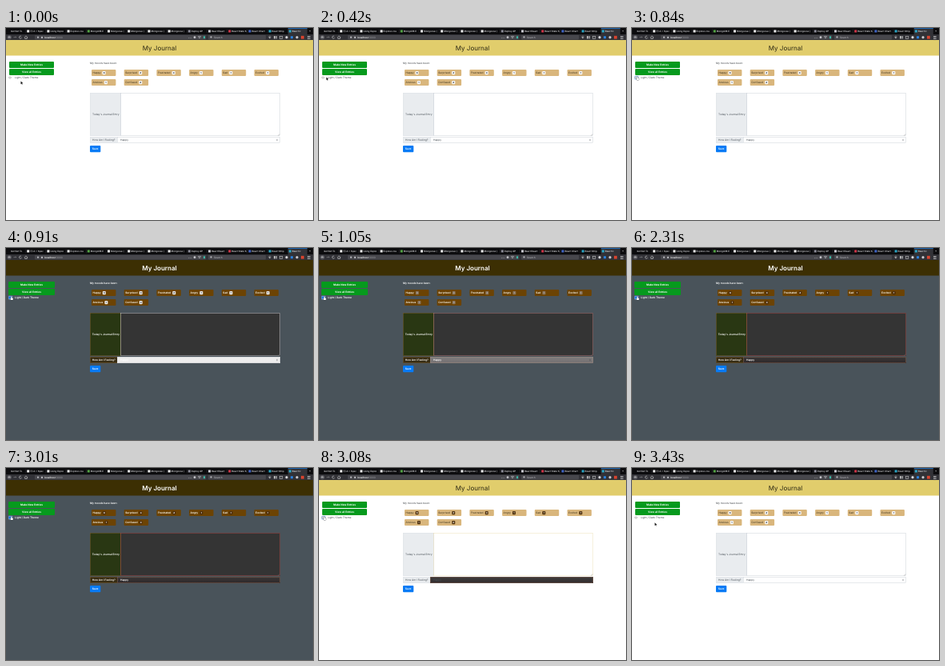
Write an HTML page with a canvas that moves like this. It is 384 px wide and 240 px high and loops after 3500 ms.

```html
<!DOCTYPE html>
<html lang="en">
<head>
<meta charset="utf-8">
<title>My Journal</title>
<style>
html, body { margin: 0; width: 100%; height: 100%; overflow: hidden; background: #fff; }
canvas { display: block; width: 100%; height: 100%; }
</style>
</head>
<body>
<canvas id="stage" width="384" height="240"></canvas>
<script>
const ctx = document.getElementById('stage').getContext('2d');
const LOOP = 3500, STEP = 70, FADE = 330;
const DARK_AT = 910, LIGHT_AT = 3080;

const themes = {
  light: {
    page: '#ffffff', header: '#e1cd6c', title: '#2c2814', ink: '#3f4448', weight: 400,
    titleWeight: 400, mood: '#d9b67c', moodInk: '#3c3320', label: '#e9ecef',
    labelEdge: '#dde1e5', labelInk: '#495057', area: '#ffffff', rowLabel: '#e9ecef',
    fieldInk: '#495057', focusEdge: '#efe2b8'
  },
  dark: {
    page: '#49535a', header: '#3c2f03', title: '#ffffff', ink: '#ffffff', weight: 600,
    titleWeight: 600, mood: '#6c4303', moodInk: '#ffffff', label: '#293713',
    labelEdge: '#7d6038', labelInk: '#ffffff', area: '#343434', rowLabel: '#372c12',
    fieldInk: '#ffffff', focusEdge: '#a34a48'
  }
};

const tabs = [
  ['Get Set To', ''], ['(1) A > Spec', '#eeeeee'], ['Using Expre', '#eeeeee'],
  ['Express rou', '#eeeeee'], ['MongoDB E', '#55a646'], ['Mongoose (', '#eeeeee'],
  ['Mongoose (', '#eeeeee'], ['Mongoose (', '#eeeeee'], ['Mongoose (', '#eeeeee'],
  ['Deploy AP', '#8c8c98'], ['React React', '#c9c9d0'], ['React State S', '#d2374a'],
  ['React Chart', '#4267c8'], ['React Strip', '#2ba7c7'], ['React Ic', '#2ba7c7']
];
const moods = ['Happy', 'Surprised', 'Frustrated', 'Angry', 'Sad', 'Excited', 'Anxious', 'Confused'];
const counts = [6, 4, 4, 1, 1, 1, 1, 4];

const clamp = v => Math.max(0, Math.min(1, v));
const ease = v => v * v * (3 - 2 * v);

function mix(a, b, p) {
  const part = (c, i) => parseInt(c.slice(i, i + 2), 16);
  return 'rgb(' + [1, 3, 5].map(i => Math.round(part(a, i) + (part(b, i) - part(a, i)) * p)) + ')';
}

function rect(x, y, w, h, fill) {
  ctx.fillStyle = fill;
  ctx.fillRect(x, y, w, h);
}

function round(x, y, w, h, r, fill) {
  ctx.fillStyle = fill;
  ctx.beginPath();
  ctx.roundRect(x, y, w, h, r);
  ctx.fill();
}

function frame(x, y, w, h, color, width = 0.5) {
  ctx.strokeStyle = color;
  ctx.lineWidth = width;
  ctx.strokeRect(x, y, w, h);
}

function line(points, color, width = 0.6) {
  ctx.strokeStyle = color;
  ctx.lineWidth = width;
  ctx.beginPath();
  points.forEach(([x, y], i) => i ? ctx.lineTo(x, y) : ctx.moveTo(x, y));
  ctx.stroke();
}

function dot(x, y, r, fill) {
  ctx.fillStyle = fill;
  ctx.beginPath();
  ctx.arc(x, y, r, 0, Math.PI * 2);
  ctx.fill();
}

// Draws text and returns its width.
function text(str, x, y, size, color, weight = 400, align = 'left') {
  ctx.font = `${weight} ${size}px Inter, "Liberation Sans", sans-serif`;
  ctx.textRendering = 'geometricPrecision';
  ctx.textAlign = align;
  ctx.textBaseline = 'middle';
  ctx.fillStyle = color;
  ctx.fillText(str, x, y);
  return ctx.measureText(str).width;
}

function drawTabs() {
  rect(0, 0, 384, 8, '#0c0c0e');
  tabs.forEach(([name, icon], i) => {
    const x = i * 25.2, active = i === tabs.length - 1;
    if (active) {
      rect(x, 0, 24, 8, '#323237');
      rect(x, 0, 24, 0.6, '#0a84ff');
    }
    if (icon) rect(x + 1, 2.5, 3, 3, icon);
    text(name, x + (icon ? 5 : 6), 4.2, 2.9, '#e6e6e8', 500);
    if (!active) rect(x + 24.4, 1.5, 0.4, 5, '#38383c');
  });
  text('+', 380, 4, 4, '#dddddd', 400, 'center');
}

function drawToolbar() {
  rect(0, 8, 384, 7, '#323237');
  dot(4.2, 11.6, 2.7, '#5b5b60');
  line([[5.6, 11.6], [3, 11.6], [4.2, 10.4]], '#f0f0f0');
  line([[9.5, 11.6], [13, 11.6], [11.8, 10.4]], '#8a8a8e');
  ctx.strokeStyle = '#dddddd';
  ctx.beginPath();
  ctx.arc(18, 11.6, 1.5, 0.4, 5.6);
  ctx.stroke();
  line([[23, 11.8], [25, 9.8], [27, 11.8], [26.3, 11.8], [26.3, 13.3], [23.7, 13.3], [23.7, 11.8]], '#dddddd');
  round(36, 9, 214, 5.4, 0.8, '#47474c');
  dot(40, 11.7, 1.1, '#bdbdc2');
  rect(44, 10.8, 2, 2, '#bdbdc2');
  const w = text('localhost', 48, 11.8, 3.2, '#ffffff', 500);
  text(':3000', 48 + w, 11.8, 3.2, '#a3a3a8');
  text('•••', 230, 11.8, 2.6, '#d0d0d4', 400, 'center');
  dot(236, 11.7, 1.4, '#c5c5ca');
  line([[240.5, 10.4], [243.5, 10.4], [242, 13], [240.5, 10.4]], '#c5c5ca');
  rect(247, 10.3, 2, 2.8, '#39b8a6');
  round(253, 9, 72, 5.4, 0.8, '#47474c');
  dot(256.5, 11.4, 1.1, '#b9b9be');
  text('Search', 260, 11.8, 3.2, '#b9b9be');
  line([[330, 9.6], [330, 12.6], [328.6, 11.3], [330, 12.6], [331.4, 11.3]], '#e0e0e0');
  for (let i = 0; i < 3; i++) rect(335 + i * 1.4, 10, 0.8, 3.4, '#e0e0e0');
  frame(342.5, 10.2, 3.3, 3, '#e0e0e0');
  dot(351, 11.7, 1.6, '#d6d6da');
  rect(356, 10.2, 3, 3, '#2b7fd9');
  dot(364, 11.7, 1.6, '#c9c9ce');
  rect(369, 9.8, 3.8, 3.8, '#d8432f');
  for (let i = 0; i < 3; i++) rect(377, 10.2 + i * 1.4, 3.6, 0.6, '#e0e0e0');
}

function drawSidebar(c, dark, t) {
  const x = dark ? 3 : 4, w = dark ? 58 : 56;
  ['Make New Entries', 'View all Entries'].forEach((name, i) => {
    round(x, 42 + i * 9, w, 8, 1, '#069a1d');
    text(name, 32, 46.1 + i * 9, 3.2, '#ffffff', 700, 'center');
  });
  const focused = t >= 770 && t < 3220;
  if (focused) round(3, 59.8, 5.4, 4.6, 1, dark ? '#719dcc' : '#a9cbf4');
  round(3.7, 60.7, 2.6, 2.6, 0.5, dark ? '#1677e8' : '#8b8b8b');
  if (!dark) rect(4.2, 61.2, 1.6, 1.6, '#ffffff');
  text('Light / Dark Theme', 11, 62.2, 3.25, c.ink, c.weight);
}

function drawMoods(c, p) {
  text('My moods have been:', 105, 44.3, 3.25, c.ink, c.weight);
  const pill = mix('#f8f9fa', '#4f2f09', p), ink = mix('#212529', '#ffffff', p);
  moods.forEach((name, i) => {
    const x = 107 + (i % 6) * 40.7, y = i < 6 ? 52 : 64;
    round(x, y, 30.4, 8, 1.1, c.mood);
    const w = text(name, x + 1.5, y + 4.2, 3.25, c.moodInk, c.weight);
    const left = x + w + 3.6;
    round(left, y + 1.9, 4, 4.4, 0.8, pill);
    text(counts[i], left + 2, y + 4.2, 2.8, ink, 700, 'center');
  });
}

function drawForm(c, p) {
  rect(105, 81, 39, 54, c.label);
  frame(105.5, 81.5, 38, 53, c.labelEdge);
  rect(144, 81, 199, 54, c.area);
  frame(143.5, 81.5, 199, 53, mix('#ced4da', c.focusEdge, p));
  text("Today's Journal Entry", 124.8, 108.4, 3.25, c.labelInk, c.weight, 'center');
  line([[340.2, 134.5], [342, 132.7]], '#7d7d7d', 0.4);
  line([[341.3, 134.5], [342, 133.8]], '#7d7d7d', 0.4);

  rect(105, 136, 34, 8, c.rowLabel);
  frame(105.5, 136.5, 34, 7, c.labelEdge);
  const fill = ctx.createLinearGradient(0, 136, 0, 144);
  fill.addColorStop(0, mix('#ffffff', '#3b3939', p));
  fill.addColorStop(1, mix('#ffffff', '#2d2628', p));
  rect(139, 136, 204, 8, fill);
  frame(139.5, 136.5, 203, 7, mix('#ced4da', '#85624f', p));
  text('How Am I Feeling?', 122.3, 140.1, 3.25, c.labelInk, c.weight, 'center');
  text('Happy', 143, 140.1, 3.25, c.fieldInk, c.weight);
  const arrow = mix('#343a40', '#342f30', p);
  line([[338.5, 139.5], [339, 138.9], [339.5, 139.5]], arrow, 0.5);
  line([[338.5, 140.5], [339, 141.1], [339.5, 140.5]], arrow, 0.5);

  round(105, 147, 13.3, 8.3, 1, '#087bf5');
  text('Save', 111.6, 151.2, 3.25, '#ffffff', 600, 'center');
}

function pointerAt(t) {
  if (t < 560) {
    const e = ease(t / 560);
    return [18.5 - 11 * e, 66.5 - 6 * e];
  }
  if (t < 770) return [7.5, 60.5];
  if (t <= LIGHT_AT) return [6, 60.5];
  const e = ease(clamp((t - LIGHT_AT) / 350));
  return [6 + 22.5 * e, 60.5 + 7.8 * e];
}

function drawPointer(t) {
  const [x, y] = pointerAt(t);
  ctx.save();
  ctx.translate(x, y);
  ctx.lineJoin = 'round';
  ctx.beginPath();
  if (t >= 770 && t < 3150) {
    ctx.roundRect(0.2, 0, 1, 3.4, 0.5);
    ctx.roundRect(-0.4, 2, 3.2, 2.6, 0.8);
    ctx.strokeStyle = '#20242a';
    ctx.fillStyle = '#ffffff';
    ctx.lineWidth = 0.5;
  } else {
    ctx.moveTo(0, 0);
    ctx.lineTo(0, 3.7);
    ctx.lineTo(0.9, 2.9);
    ctx.lineTo(1.5, 4.2);
    ctx.lineTo(2.1, 3.9);
    ctx.lineTo(1.6, 2.7);
    ctx.lineTo(2.7, 2.6);
    ctx.closePath();
    ctx.strokeStyle = '#ffffff';
    ctx.fillStyle = '#111111';
    ctx.lineWidth = 0.8;
  }
  ctx.stroke();
  ctx.fill();
  ctx.restore();
}

function draw(t) {
  const dark = t >= DARK_AT && t < LIGHT_AT;
  const c = dark ? themes.dark : themes.light;
  // Controls fade after the page colours switch.
  const p = t < LIGHT_AT
    ? ease(clamp((t - DARK_AT + 60) / FADE))
    : 1 - ease(clamp((t - LIGHT_AT + 30) / FADE));
  rect(0, 0, 384, 240, c.page);
  drawTabs();
  drawToolbar();
  rect(0, 15, 384, 19.5, c.header);
  text('My Journal', 192, 25.2, 8, c.title, c.titleWeight, 'center');
  drawSidebar(c, dark, t);
  drawMoods(c, p);
  drawForm(c, p);
  drawPointer(t);
}

const start = performance.now();
function tick() {
  const t = (performance.now() - start) % LOOP;
  draw(Math.floor(t / STEP) * STEP);
  requestAnimationFrame(tick);
}
tick();
</script>
</body>
</html>
```
